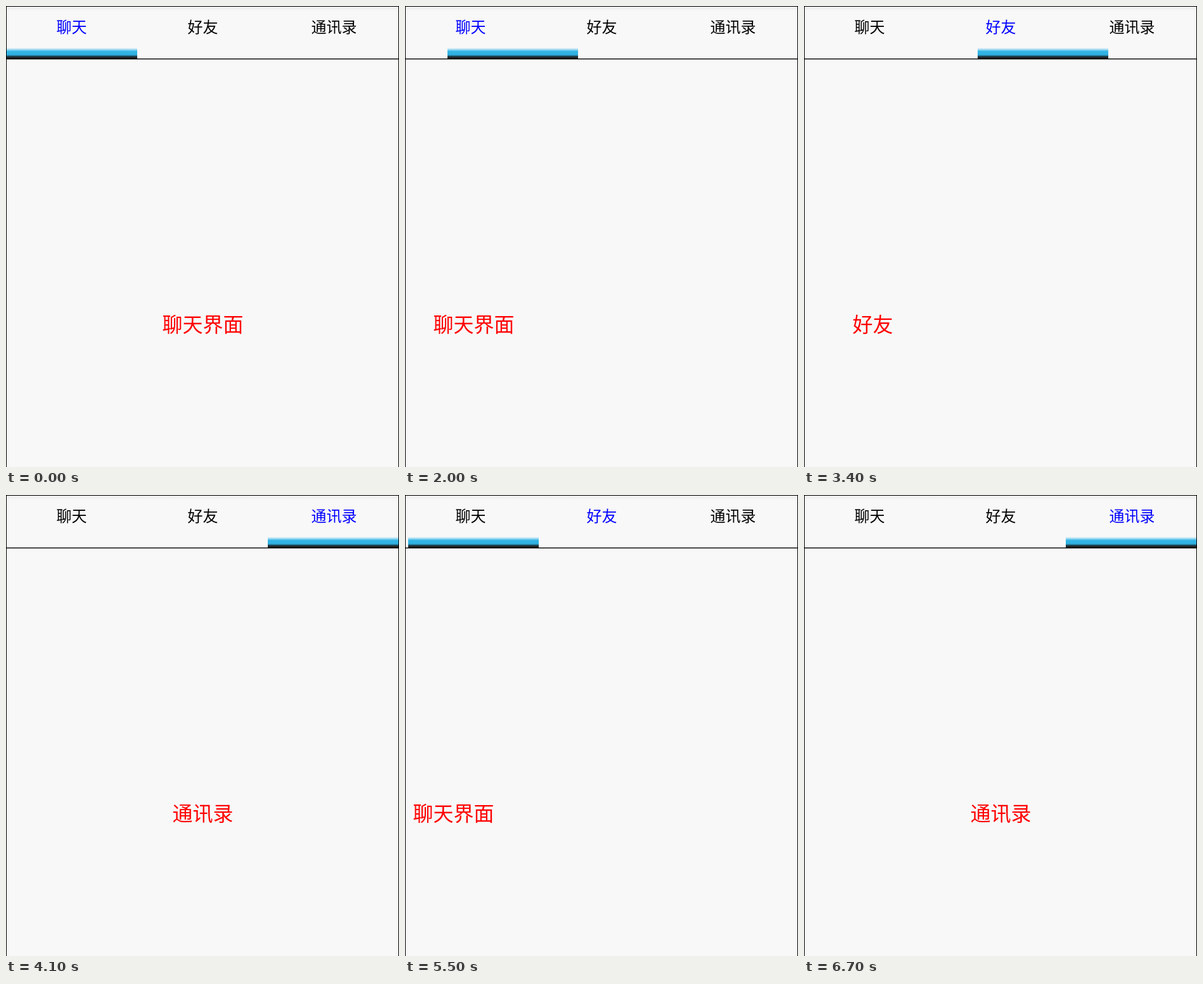
Animation, 620 px wide and 727 px high, one loop 7100 ms. Source, as an HTML page with a canvas:

```html
<!DOCTYPE html>
<html lang="zh-CN">
<head>
<meta charset="utf-8">
<title>聊天</title>
<style>
  html, body { margin: 0; width: 100%; height: 100%; overflow: hidden; background: #f8f8f8; }
  canvas { display: block; }
</style>
</head>
<body>
<canvas id="stage" width="620" height="727"></canvas>
<script>
const ctx = document.getElementById('stage').getContext('2d');
const W = 620, H = 727, LOOP = 7100, STEP = 100;
const TAB_W = 206.2, CENTER = 310.5;
const FONT = '"Noto Sans CJK SC", "Noto Sans CJK", sans-serif';
const tabs = ['聊天', '好友', '通讯录'];
const pages = ['聊天界面', '好友', '通讯录'];

// Share of the way covered after each step; the bar trails the page once it is released.
const drag = {
  page: [.0234, .07, .14, .23, .326, .42, .63, .876, .97, .9965, .9995, 1],
  bar: [.0194, .066, .136, .226, .322, .415, .54, .775, .93, .984, .997, 1],
  selectAt: 6
};
const flick = { page: [.377, .756, .96, 1], bar: [.0194, .58, .9, 1], selectAt: 0 };
const push = { page: [.163, .7, .95, 1], bar: [.1, .55, .89, 1], selectAt: 1 };
const tap = { page: [.28, .75, .94, .99, 1], bar: [.1, .6, .9, .98, 1], selectAt: 0 };

const moves = [
  { start: 1600, from: 0, to: 1, track: drag },
  { start: 3000, from: 1, to: 2, track: drag },
  { start: 4700, from: 2, to: 0, track: tap },
  { start: 5500, from: 0, to: 1, track: flick },
  { start: 6400, from: 1, to: 2, track: push }
];

function poseAt(time) {
  const move = moves.filter(m => m.start <= time).pop();
  if (!move) return { page: 0, bar: 0, tab: 0 };
  const { start, from, to, track } = move;
  const step = Math.floor((time - start) / STEP);
  const along = points => from + (to - from) * points[Math.min(step, points.length - 1)];
  return {
    page: along(track.page),
    bar: along(track.bar),
    tab: step >= track.selectAt ? to : from
  };
}

function verticalGradient(top, bottom, stops) {
  const gradient = ctx.createLinearGradient(0, top, 0, bottom);
  for (const [y, color] of stops) gradient.addColorStop((y - top) / (bottom - top), color);
  return gradient;
}

const topShade = verticalGradient(1, 9, [[1, '#e6e6e6'], [4, '#f2f2f2'], [9, '#f8f8f8']]);
const barFill = verticalGradient(66, 83, [
  [66, '#f4f8fa'], [68.5, '#a6dcf2'], [71.5, '#33b5e5'],
  [77, '#2fb0e0'], [79.5, '#1c4252'], [81, '#202020'], [83, '#222222']
]);

function fill(color, x, y, w, h) {
  ctx.fillStyle = color;
  ctx.fillRect(x, y, w, h);
}

function label(text, x, baseline, size, color) {
  ctx.font = `${size}px ${FONT}`;
  ctx.fillStyle = color;
  ctx.fillText(text, x, baseline);
}

function draw(time) {
  const { page, bar, tab } = poseAt(time);
  fill('#f8f8f8', 0, 0, W, H);
  fill(topShade, 0, 1, W, 8);
  ctx.textAlign = 'center';
  tabs.forEach((text, i) =>
    label(text, 103.5 + i * 207, 42, 24, i === tab ? '#0000ff' : '#000'));
  fill(barFill, Math.round(1 + bar * TAB_W), 66, 206, 17);
  pages.forEach((text, i) =>
    label(text, Math.round((i - page) * W) + CENTER, 514, 32, '#ff0000'));
  fill('#000', 0, 82.8, W, 1.4);
  fill('#000', 0, 0, W, 1);
  fill('#000', 0, 0, 1, H);
  fill('#000', W - 1, 0, 1, H);
}

const begin = performance.now();
function tick() {
  draw((performance.now() - begin) % LOOP);
  requestAnimationFrame(tick);
}
tick();
</script>
</body>
</html>
```
